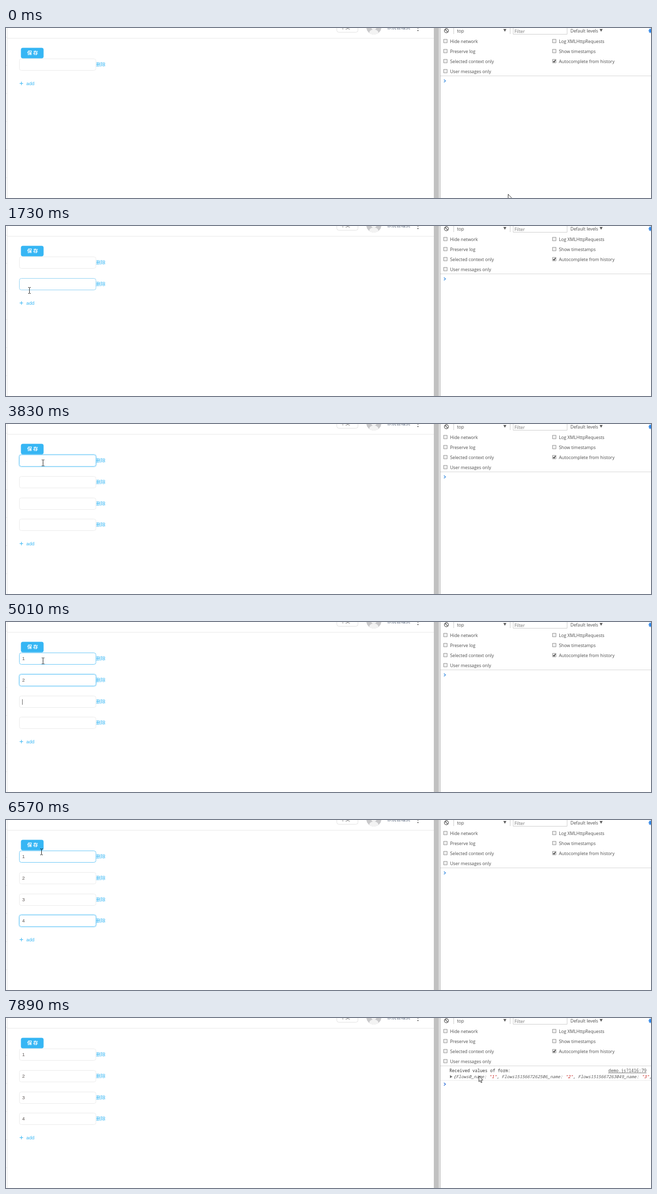
Write an HTML page with a canvas that moves like this. It is 1280x339 px and loops after 8 s.

```html
<!DOCTYPE html>
<html lang="zh">
<head>
<meta charset="utf-8">
<title>Dynamic form</title>
<style>
html, body { margin: 0; width: 100%; height: 100%; overflow: hidden; background: #fff; }
canvas { display: block; }
</style>
</head>
<body>
<canvas id="stage" width="1280" height="339"></canvas>
<script>
const ctx = document.getElementById('stage').getContext('2d');
const LOOP = 8000;
const BLUE = '#36b6f4';
const UI = '8.8px "Open Sans", sans-serif';
const FORM = '9.6px "Liberation Sans", Arial, sans-serif';
const CJK = '"Noto Sans CJK SC", "Noto Sans CJK", sans-serif';
const MONO = '8.42px "Noto Sans Mono", monospace';
const FADE = 170, BLINK = 550;
const CLICK = 7050, LOGGED = 7127;

// Fields: when each is added, hovered, focused and typed into.
const FIELDS = [
  { added: -1, hover: [[3145, 6650]], focus: [3280, 4550], typed: 4380 },
  { added: 1570, hover: [[1610, 1850], [2700, 2740]], focus: [4550, 5010], typed: 5010 },
  { added: 2200, hover: [[2200, 2320], [2600, 2700]], focus: [5010, 5480], typed: 5480 },
  { added: 2510, hover: [[2510, 2600]], focus: [5480, 7080], typed: 6020 }
];

// Pointer moves: start, end, number of steps, destination.
const START = [996, 331];
const MOVES = [
  [70, 800, 11, 45, 117],
  [1280, 1420, 3, 46, 113],
  [1650, 1730, 2, 46, 128],
  [1820, 1970, 3, 46, 153],
  [2280, 2440, 3, 47, 196],
  [2590, 2810, 4, 64, 129],
  [2930, 2980, 2, 68, 95],
  [3070, 3220, 3, 73, 77],
  [6570, 6570, 1, 70, 63],
  [6650, 6810, 3, 66, 51],
  [7204, 7820, 9, 932, 121],
  [7890, 7890, 1, 938, 115]
];

const clamp = v => Math.max(0, Math.min(1, v));
const ease = p => p * p * (3 - 2 * p);
const fade = (t, [on, off]) => clamp((t - on) / FADE) * (1 - clamp((t - off) / FADE));
const mix = (a, b, p) => `rgb(${a.map((v, i) => Math.round(v + (b[i] - v) * p))})`;
const fieldY = i => Math.round(61.3 + 42.7 * i) + 0.5;
const addY = n => Math.floor(110.4 + 42.7 * (n - 1));

function text(str, x, y, font, color, align = 'left') {
  ctx.font = font;
  ctx.fillStyle = color;
  ctx.textAlign = align;
  ctx.fillText(str, x, y);
}

function rect(x, y, w, h, color) {
  ctx.fillStyle = color;
  ctx.fillRect(x, y, w, h);
}

function box(x, y, w, h, r, fill, stroke, width = 1) {
  ctx.beginPath();
  ctx.roundRect(x, y, w, h, r);
  if (fill) { ctx.fillStyle = fill; ctx.fill(); }
  if (stroke) { ctx.strokeStyle = stroke; ctx.lineWidth = width; ctx.stroke(); }
}

function disc(x, y, r, color) {
  ctx.beginPath();
  ctx.arc(x, y, r, 0, Math.PI * 2);
  ctx.fillStyle = color;
  ctx.fill();
}

function line(points, color, width = 1) {
  ctx.beginPath();
  points.forEach(([x, y]) => ctx.lineTo(x, y));
  ctx.strokeStyle = color;
  ctx.lineWidth = width;
  ctx.stroke();
}

function poly(points, fill, stroke) {
  ctx.beginPath();
  points.forEach(([x, y]) => ctx.lineTo(x, y));
  ctx.closePath();
  ctx.fillStyle = fill;
  ctx.fill();
  if (stroke) { ctx.strokeStyle = stroke; ctx.lineWidth = 1; ctx.stroke(); }
}

function drawHeader() {
  rect(2, 0, 1, 339, '#e6e6e6');
  rect(3, 20, 846, 1, '#e9e9e9');
  for (let y = 18; y < 339; y += 56) rect(0, y, 2, 1, '#ececec');
  box(656.5, -12.5, 42, 21, 4, '#fff', '#e2e2e2');
  text('中文', 664, 1.8, '9.4px ' + CJK, '#666');
  ctx.save();
  ctx.beginPath();
  ctx.arc(730, -2, 15, 0, Math.PI * 2);
  ctx.clip();
  rect(714, 0, 32, 14, '#c9c9cb');
  ctx.beginPath();
  ctx.ellipse(730, 9, 9, 6, 0, 0, Math.PI * 2);
  ctx.fillStyle = '#f3f3f3';
  ctx.fill();
  disc(730, -2, 5.5, '#f3f3f3');
  ctx.restore();
  text('系统管理员', 756, 2.1, '9.3px ' + CJK, '#5d6b80');
  disc(817.5, 0, 1.2, '#666');
  disc(817.5, 5, 1.2, '#666');
}

function drawButton(t) {
  const x = 29.6, y = 39.6, w = 45, h = 21;
  const wave = clamp((t - CLICK) / 360);
  if (wave > 0 && wave < 1) {
    const d = 3 * wave;
    box(x - d, y - d, w + 2 * d, h + 2 * d, 4 + d, `rgba(54,182,244,${0.4 * (1 - wave)})`);
  }
  const hover = fade(t, [6700, 7204]);
  box(x, y, w, h, 4, mix([54, 182, 244], [94, 198, 247], hover));
  const font = 'bold 9.6px ' + CJK;
  text('保', 42, 53.2, font, '#fff');
  text('存', 54, 53.2, font, '#fff');
}

function drawField(field, i, t) {
  if (t < field.added) return;
  const y = fieldY(i);
  const focus = fade(t, field.focus);
  const hover = Math.max(focus, ...field.hover.map(span => fade(t, span)));
  if (focus) box(25.3, y - 1.2, 154.4, 25.4, 5, null, `rgba(54,182,244,${0.22 * focus})`, 1.6);
  box(26.5, y, 152, 23, 4, '#fff', mix([233, 233, 233], [92, 194, 246], hover), 0.9);

  const typed = t >= field.typed;
  if (typed) text(String(i + 1), 32, y + 14.5, FORM, '#5c5552');
  const [from, to] = field.focus;
  const since = typed ? field.typed : from;
  if (t >= from && t < to && Math.floor((t - since) / BLINK) % 2 === 0) {
    rect(typed ? 37 : 32, y + 6.5, 1, 11, '#666');
  }
  text('删除', 178.7, y + 14.5, '500 9.4px ' + CJK, BLUE);
}

function drawAdd(rows, hot) {
  const y = addY(rows), color = hot ? '#5ec6f7' : BLUE;
  rect(27, y, 7, 1, color);
  rect(30, y - 3, 1, 7, color);
  text('add', 40.3, y + 4, FORM, color);
}

function checkbox(label, x, y, checked) {
  box(x + 0.5, y - 3.5, 7, 7, 0, '#eee', '#9a9a9a');
  if (checked) line([[x + 2, y], [x + 3.6, y + 2], [x + 6.4, y - 2.2]], '#333', 1.5);
  text(label, x + 13.2, y + 4, UI, '#4c4c4c');
}

function chevron(y, color) {
  line([[869, y - 2.7], [872.3, y], [869, y + 2.7]], color, 1.3);
}

function caretDown(x, y) {
  poly([[x - 3, y - 3], [x + 3, y - 3], [x, y + 2.5]], '#5a5a5a');
}

function drawTools() {
  rect(849, 0, 10, 339, '#c1c1c1');
  rect(859, 0, 2, 339, '#ececec');
  rect(861, 0, 1, 339, '#a9a9a9');

  ctx.beginPath();
  ctx.arc(874, 5.5, 4, 0, Math.PI * 2);
  ctx.strokeStyle = '#5a5a5a';
  ctx.lineWidth = 1.3;
  ctx.stroke();
  line([[871.2, 2.7], [876.8, 8.3]], '#5a5a5a', 1.3);
  rect(888, 0, 1, 12, '#ccc');
  rect(1000, 0, 1, 12, '#ccc');
  text('top', 895, 9, UI, '#4c4c4c');
  caretDown(990, 5);
  box(1006.5, -6.5, 107, 19, 0, '#fff', '#cfcfcf');
  text('Filter', 1009, 9.5, UI, '#757575');
  text('Default levels', 1120, 9, UI, '#4c4c4c');
  caretDown(1181, 5);
  for (let a = 0; a < 8; a++) {
    const c = Math.cos(a * Math.PI / 4), s = Math.sin(a * Math.PI / 4);
    line([[1280 + 2 * c, 5.5 + 2 * s], [1280 + 5 * c, 5.5 + 5 * s]], '#2f86e8', 1.8);
  }
  disc(1280, 5.5, 3.6, '#2f86e8');

  ['Hide network', 'Preserve log', 'Selected context only', 'User messages only']
    .forEach((label, i) => checkbox(label, 868, 26 + 20 * i));
  ['Log XMLHttpRequests', 'Show timestamps', 'Autocomplete from history']
    .forEach((label, i) => checkbox(label, 1084, 26 + 20 * i, i === 2));
  rect(862, 95, 418, 1, '#d6d6d6');
}

function drawConsole(t) {
  if (t < LOGGED) {
    chevron(105.5, '#3b8ee0');
    return;
  }
  text('Received values of form:', 880, 108.3, MONO, '#333');
  text('demo.js?1416:79', 1271, 108.3, MONO, '#545454', 'right');
  rect(1195, 109, 76, 1, '#777');
  poly([[881, 114], [886, 117], [881, 120]], '#727272');
  const font = 'italic ' + MONO;
  let x = 888;
  const put = (str, color) => {
    text(str, x, 120.2, font, color);
    x += ctx.measureText(str).width;
  };
  put('{', '#333');
  ['0', '1515667262506', '1515667263049'].forEach((id, i) => {
    put(`Flows${id}_name`, '#565656');
    put(': ', '#333');
    put(`"${i + 1}"`, '#c41a16');
    put(', ', '#333');
  });
  rect(862, 124, 418, 1, '#ececec');
  chevron(132, '#2f6fd8');
}

function pointerAt(t) {
  let [x, y] = START;
  for (const [t0, t1, n, tx, ty] of MOVES) {
    if (t < t0) break;
    const step = n > 1 ? Math.floor((t - t0) / (t1 - t0) * (n - 1) + 0.001) : 0;
    const p = ease(clamp((step + 1) / n));
    x += (tx - x) * p;
    y += (ty - y) * p;
  }
  return [Math.round(x), Math.round(y)];
}

function pointerShape(x, y, rows) {
  if (x >= 30 && x <= 75 && y >= 40 && y < 61) return 'hand';
  if (x >= 26 && x <= 58 && Math.abs(y - addY(rows)) < 6) return 'hand';
  for (let i = 0; i < rows; i++) {
    if (x >= 26 && x <= 179 && y >= fieldY(i) - 1 && y <= fieldY(i) + 26) return 'beam';
  }
  return 'arrow';
}

function drawPointer(x, y, shape) {
  ctx.save();
  ctx.translate(x, y);
  if (shape === 'beam') {
    rect(0, -5, 1, 11, '#222');
    rect(-2, -6, 2, 1, '#222');
    rect(1, -6, 2, 1, '#222');
    rect(-2, 6, 2, 1, '#222');
    rect(1, 6, 2, 1, '#222');
  } else if (shape === 'hand') {
    poly([[-1, 0.5], [1, 0.5], [1.5, 5], [4, 5], [6.5, 5.8], [8.5, 7], [8.5, 10.5],
      [6.8, 13], [6.8, 15], [-0.5, 15], [-0.8, 13], [-4, 9], [-3.4, 7.6], [-1, 9]], '#fff', '#222');
    line([[3.8, 5], [3.8, 8]], '#222', 0.7);
    line([[6.3, 6], [6.3, 8.5]], '#222', 0.7);
  } else {
    poly([[0.5, 0.5], [0.5, 12], [3, 9.7], [4.9, 14], [6.6, 13.2], [4.8, 9.1], [8.4, 8.9]],
      '#fff', '#333');
  }
  ctx.restore();
}

function draw(t) {
  const rows = FIELDS.filter(f => t >= f.added).length;
  const [x, y] = pointerAt(t);
  const shape = pointerShape(x, y, rows);
  rect(0, 0, 1280, 339, '#fff');
  drawHeader();
  drawButton(t);
  FIELDS.forEach((field, i) => drawField(field, i, t));
  drawAdd(rows, shape === 'hand' && y > 90);
  drawTools();
  drawConsole(t);
  drawPointer(x, y, shape);
}

function tick() {
  draw(performance.now() % LOOP);
  requestAnimationFrame(tick);
}
tick();
</script>
</body>
</html>
```
